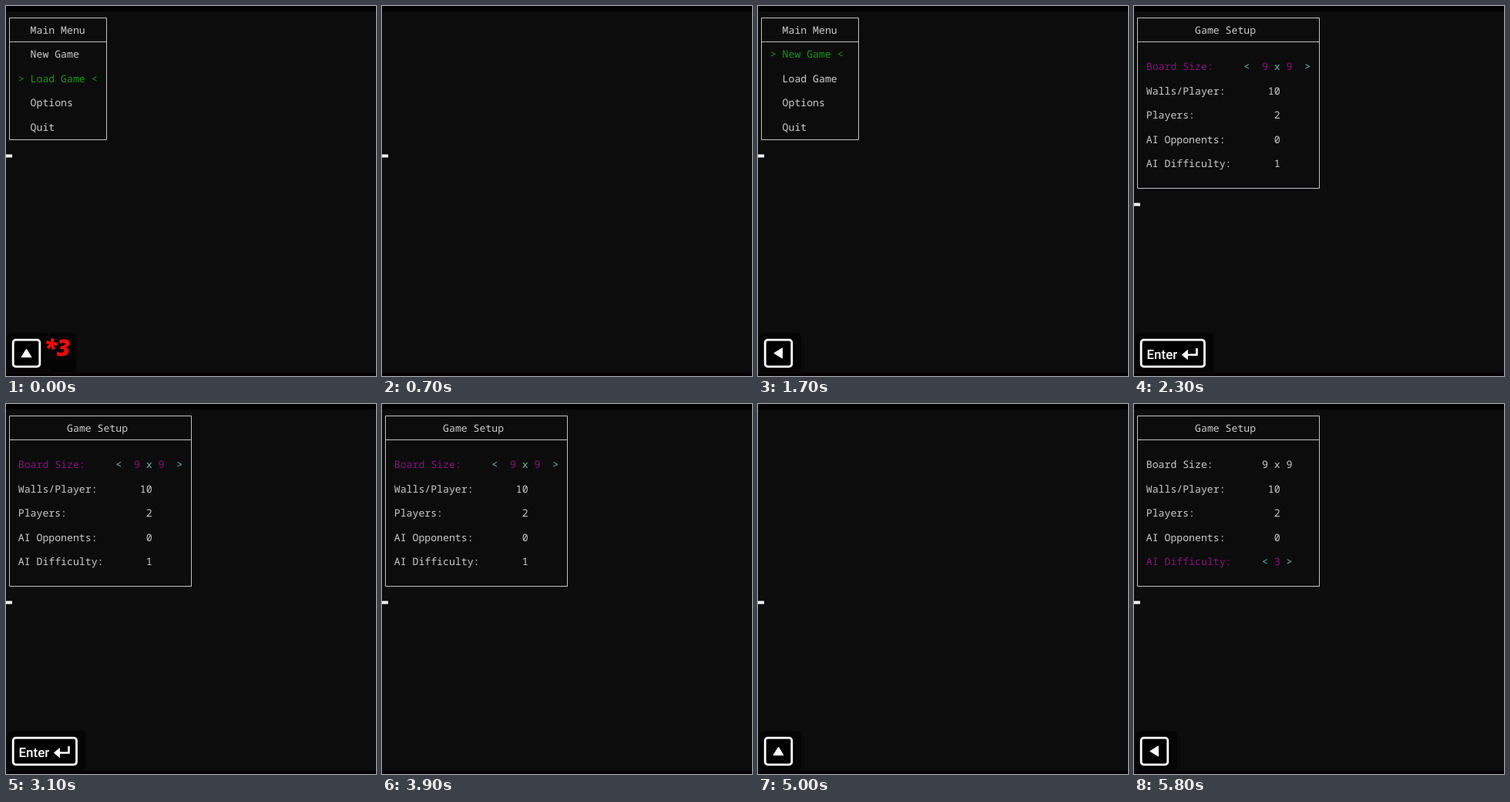
Write an HTML page that moves like this. It is 480x480 px and loops after 5.9 s.

```html
<!DOCTYPE html>
<html lang="en">
<head>
<meta charset="utf-8">
<title>Console menu</title>
<style>
  html, body { margin: 0; width: 100%; height: 100%; overflow: hidden; background: #000; }
  svg { display: block; width: 100vw; height: 100vh; }
  text { white-space: pre; text-rendering: geometricPrecision; }
  .term { font: 13.18px "Noto Sans Mono", monospace; fill: #ccc; }
  .frame { fill: none; stroke: #c4c1c6; stroke-width: 1; }
  .green { fill: #139a12; }
  .pink { fill: #8b1183; }
  .cyan { fill: #70bcc4; }
  .pad { fill: #000; fill-opacity: .6; }
  .cap { fill: #000; stroke: #fff; stroke-width: 2.8; }
  .glyph { fill: #fff; stroke: #fff; stroke-width: 1; stroke-linejoin: round; }
  .label { font: 500 17px Roboto, sans-serif; fill: #fff; }
  .count { font: italic 800 30px "Open Sans", sans-serif; fill: #f50808; }

  .scene { opacity: 0; animation: 5.9s step-end infinite; }

  #load { animation-name: load; }
  #new { animation-name: new; }
  #setup { animation-name: setup; }
  #board { animation-name: board; }
  #level1 { animation-name: level1; }
  #level3 { animation-name: level3; }
  #cursor { animation: cursor 5.9s step-end infinite; }
  @keyframes load { 0% { opacity: 1 } 11.78%, 100% { opacity: 0 } }
  @keyframes new { 0% { opacity: 0 } 13.475% { opacity: 1 } 33.81%, 100% { opacity: 0 } }
  @keyframes setup {
    0% { opacity: 0 } 35.508% { opacity: 1 } 84.66% { opacity: 0 }
    86.356% { opacity: 1 } 93.136% { opacity: 0 } 94.83%, 100% { opacity: 1 }
  }
  @keyframes board { 0% { opacity: 0 } 35.508% { opacity: 1 } 84.66%, 100% { opacity: 0 } }
  @keyframes level1 { 0% { opacity: 0 } 86.356% { opacity: 1 } 93.136%, 100% { opacity: 0 } }
  @keyframes level3 { 0% { opacity: 0 } 94.83%, 100% { opacity: 1 } }
  @keyframes cursor { 0% { transform: none } 35.508%, 100% { transform: translateY(63px) } }

  #kUp3 { animation-name: kUp3; }
  #kLeft { animation-name: kLeft; }
  #kEnter { animation-name: kEnter; }
  #kUp { animation-name: kUp; }
  @keyframes kUp3 { 0% { opacity: 1 } 10.085%, 100% { opacity: 0 } }
  @keyframes kLeft {
    0% { opacity: 0 } 13.475% { opacity: 1 } 33.81% { opacity: 0 } 94.83%, 100% { opacity: 1 }
  }
  @keyframes kEnter { 0% { opacity: 0 } 35.508% { opacity: 1 } 59.237%, 100% { opacity: 0 } }
  @keyframes kUp { 0% { opacity: 0 } 84.66% { opacity: 1 } 93.136%, 100% { opacity: 0 } }
</style>
</head>
<body>
<svg viewBox="0 0 480 480">
  <defs>
    <g id="menuFrame">
      <path class="frame" d="M4.5 15.5H130.5V173.5H4.5ZM4.5 46.5H130.5"/>
      <text x="31.6" y="35.6">Main Menu</text>
      <text x="31.6" y="130.4">Options</text>
      <text x="31.6" y="162">Quit</text>
    </g>
    <g id="square">
      <rect class="pad" x="2" y="424" width="54" height="51" rx="6"/>
      <rect class="cap" x="9.2" y="433.2" width="34.6" height="34.6" rx="3.5"/>
    </g>
    <path id="up" class="glyph" d="M26.5 445L33 455.5H20Z"/>
  </defs>

  <rect y="7" width="480" height="469" fill="#0c0c0c"/>
  <rect y="476" width="480" height="4" fill="#050004"/>

  <g class="term">
    <g id="load" class="scene">
      <use href="#menuFrame"/>
      <text x="31.6" y="67.2">New Game</text>
      <text class="green" x="15.8" y="98.8">&gt; Load Game &lt;</text>
    </g>
    <g id="new" class="scene">
      <use href="#menuFrame"/>
      <text class="green" x="15.8" y="67.2">&gt; New Game &lt;</text>
      <text x="31.6" y="98.8">Load Game</text>
    </g>

    <g id="setup" class="scene">
      <path class="frame" d="M4.5 15.5H240.5V236.5H4.5ZM4.5 46.5H240.5"/>
      <text x="79.1" y="35.6">Game Setup</text>
      <text x="15.8" y="114.6">Walls/Player:       10</text>
      <text x="15.8" y="146.2">Players:             2</text>
      <text x="15.8" y="177.8">AI Opponents:        0</text>
    </g>
    <g id="board" class="scene">
      <text class="pink" x="15.8" y="83">Board Size:     <tspan class="cyan">&lt;</tspan>  9 <tspan class="cyan">x</tspan> 9  <tspan class="cyan">&gt;</tspan></text>
      <text x="15.8" y="209.4">AI Difficulty:       1</text>
    </g>
    <g id="level1" class="scene">
      <text x="15.8" y="83">Board Size:        9 x 9</text>
      <text class="pink" x="15.8" y="209.4">AI Difficulty:     <tspan class="cyan">&lt;</tspan> 1 <tspan class="cyan">&gt;</tspan></text>
    </g>
    <g id="level3" class="scene">
      <text x="15.8" y="83">Board Size:        9 x 9</text>
      <text class="pink" x="15.8" y="209.4">AI Difficulty:     <tspan class="cyan">&lt;</tspan> 3 <tspan class="cyan">&gt;</tspan></text>
    </g>
    <rect id="cursor" y="192.5" width="8" height="4" fill="#f2f2f2"/>
  </g>

  <g id="kUp3" class="scene">
    <rect class="pad" x="56" y="424" width="35" height="51" rx="4"/>
    <use href="#square"/>
    <use href="#up"/>
    <text class="count" x="49.5" y="453.5">*3</text>
  </g>
  <g id="kLeft" class="scene">
    <use href="#square"/>
    <path class="glyph" d="M20.8 450.4L31.5 443.8V457Z"/>
  </g>
  <g id="kEnter" class="scene">
    <rect class="pad" x="2" y="424" width="102" height="51" rx="6"/>
    <rect class="cap" x="9.2" y="433.2" width="82.3" height="34.6" rx="3.5"/>
    <text class="label" x="16.5" y="457.5">Enter</text>
    <path d="M81.5 444V452.5H67" fill="none" stroke="#fff" stroke-width="2.6"/>
    <path class="glyph" d="M62.5 452.5L69.5 446.5V458.5Z"/>
  </g>
  <g id="kUp" class="scene">
    <use href="#square"/>
    <use href="#up"/>
  </g>
</svg>
</body>
</html>
```
